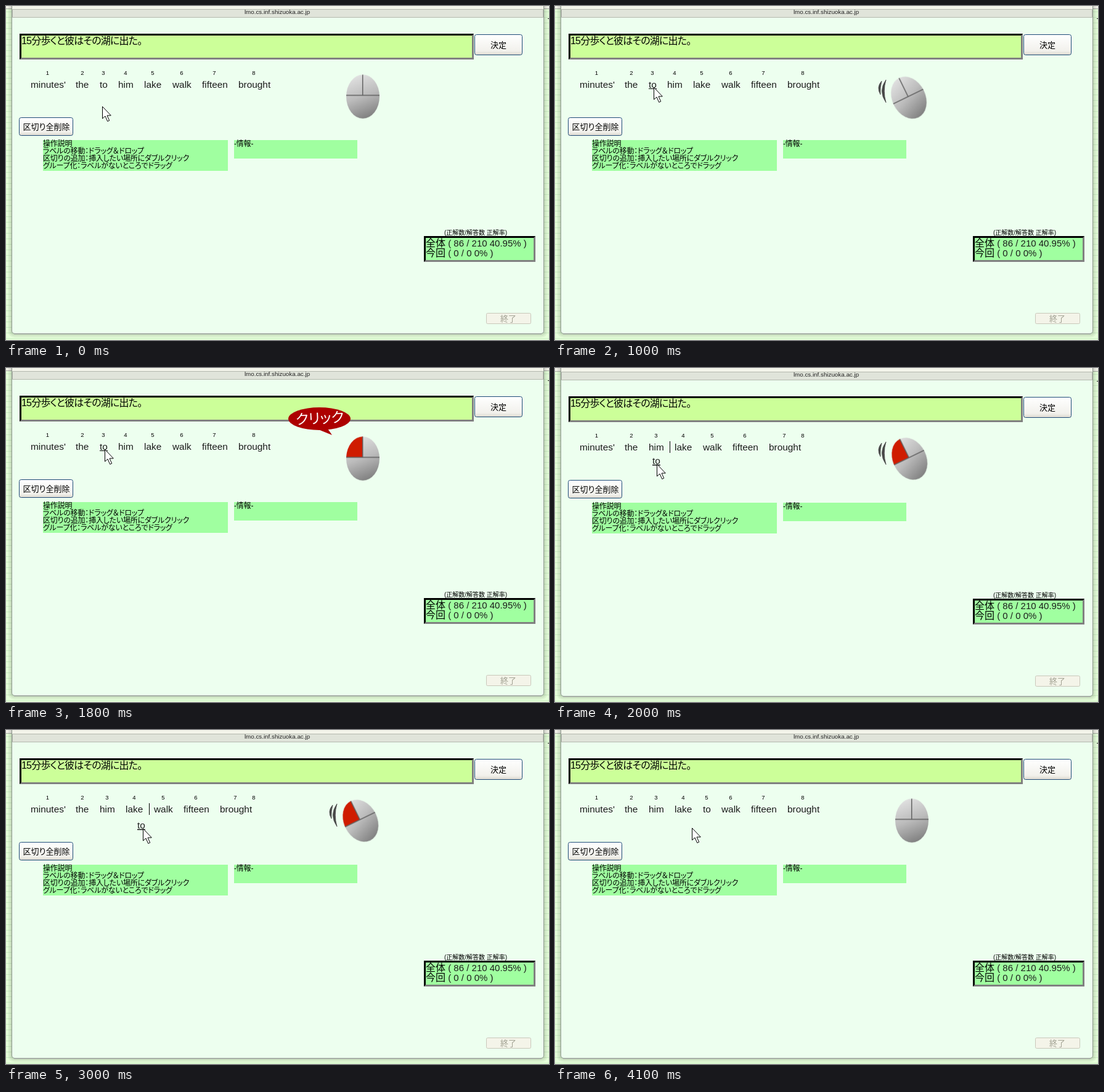
Animation of 881x543 px, one loop 4500 ms. Source, as an HTML page:

```html
<!DOCTYPE html>
<html lang="ja">
<head>
<meta charset="utf-8">
<title>並べ替え問題の操作</title>
<style>
  html, body { margin: 0; width: 100%; height: 100%; overflow: hidden; background: #e6ffda; }
  svg { display: block; width: 881px; height: 543px; }
  text {
    font: 300 16px "Liberation Sans", "Noto Sans CJK JP", "Noto Sans CJK", sans-serif;
    font-feature-settings: "palt";
    white-space: pre;
  }
  .prompt { letter-spacing: -.8px; }
  .help text { font-size: 12px; font-weight: 400; letter-spacing: -.2px; }
  .label { font-size: 13px; font-weight: 400; text-anchor: middle; }
  .address { font-size: 9.8px; text-anchor: middle; fill: #222; }
  .caption { font-size: 10px; font-weight: 500; text-anchor: middle; }
  .score { font-size: 15px; fill: #1c1c1c; }
  .word { font-size: 15.4px; fill: #1c1c1c; }
  .index { font-size: 9.5px; text-anchor: middle; }
  .shout { font-size: 23px; font-weight: 500; text-anchor: middle; fill: #fff; }
  .held { text-decoration: underline; }
  .button { fill: url(#face); stroke: #1f4a78; }
  .panel { fill: #a0ffa0; }

  .anim { animation: 4.5s step-end infinite; }
  .page { animation-name: page; }
  .before { animation-name: before; }
  .during { animation-name: during; }
  .after { animation-name: after; }
  .hover { animation-name: hover; }
  .bar { animation-name: bar; }
  .drag { animation-name: drag; }
  .cursor { animation-name: cursor; }
  .mouse { animation-name: mouse; }
  .pressed { animation-name: pressed; }
  .swing { animation-name: swing; }
  .bubble { animation-name: bubble; }

  @keyframes page { 0% { transform: none } 44.444%, 100% { transform: translateY(1px) } }
  @keyframes before { 0% { opacity: 1 } 44.444%, 100% { opacity: 0 } }
  @keyframes during { 0% { opacity: 0 } 44.444% { opacity: 1 } 77.778%, 100% { opacity: 0 } }
  @keyframes after { 0% { opacity: 0 } 77.778%, 100% { opacity: 1 } }
  @keyframes hover { 0% { opacity: 0 } 22.222% { opacity: 1 } 44.444%, 100% { opacity: 0 } }
  @keyframes pressed { 0% { opacity: 0 } 33.333% { opacity: 1 } 77.778%, 100% { opacity: 0 } }
  @keyframes bubble { 0% { opacity: 0 } 33.333% { opacity: 1 } 44.444%, 100% { opacity: 0 } }
  @keyframes swing {
    0%, 33.333% { opacity: 0 }
    22.222%, 44.444% { opacity: 1 }
    77.778%, 100% { opacity: 0 }
  }
  @keyframes bar { 0% { transform: translateX(186px) } 66.667%, 100% { transform: translateX(232px) } }
  @keyframes drag {
    0% { transform: translate(158px, 156px) }
    55.556% { transform: translate(170px, 162px) }
    66.667%, 100% { transform: translate(213px, 160px) }
  }
  @keyframes cursor {
    0% { transform: translate(156px, 163px) }
    22.222% { transform: translate(160px, 132px) }
    44.444% { transform: translate(165px, 156px) }
    55.556% { transform: translate(177px, 162px) }
    66.667% { transform: translate(222px, 160px) }
    77.778%, 100% { transform: translate(222px, 159px) }
  }
  @keyframes mouse {
    0%, 33.333% { transform: translate(579px, 147.2px) }
    22.222% { transform: translate(574px, 149px) rotate(-26deg) }
    44.444% { transform: translate(575.3px, 147.5px) rotate(-26deg) }
    77.778%, 100% { transform: translate(579px, 147.2px) }
  }
</style>
</head>
<body>
<svg viewBox="0 0 881 543">
  <defs>
    <linearGradient id="face" x2="0" y2="1">
      <stop stop-color="#fff"/><stop offset=".8" stop-color="#f2f1ec"/><stop offset="1" stop-color="#dcd8ce"/>
    </linearGradient>
    <linearGradient id="shell" x1=".3" x2=".6" y2="1">
      <stop stop-color="#e2e2e2"/><stop offset=".5" stop-color="#bcbcbc"/><stop offset="1" stop-color="#808080"/>
    </linearGradient>
    <pattern id="ruled" width="20" height="9" patternUnits="userSpaceOnUse">
      <path fill="#e6ffda" d="M0 0h20v9H0z"/><path fill="#ccefc4" d="M0 0h20v1H0z"/>
    </pattern>
    <path id="frame" d="M9.500 -9V528q0 4.500 5 4.500H867.500q5 0 5 -4.500V-9z"/>
  </defs>

  <g class="page anim">
    <path fill="url(#ruled)" d="M0 -2H881V545H0z"/>
    <path fill="#f3f4ea" d="M0 -2H881V5H0z"/>
    <path fill="#a8aca2" d="M0 4H881V5H0z"/>
    <path fill="#222" d="M879 20h2v1h-2z"/>
    <g fill="none" stroke="#000" stroke-opacity=".05">
      <use href="#frame" stroke-width="13"/>
      <use href="#frame" stroke-width="8"/>
      <use href="#frame" stroke-width="4"/>
    </g>
    <use href="#frame" fill="#edffef" stroke="#8d978d"/>
    <path fill="#a7b0a7" d="M13 532H869v2H13z"/>
    <path fill="#f3f4ea" d="M10 -2H872V5H10z"/>
    <path fill="#e0e4da" stroke="#b4b8ae" d="M10.500 5.500H871.500V18.500H10.500z"/>
    <text class="address" x="440" y="13">lmo.cs.inf.shizuoka.ac.jp</text>

    <path fill="#808080" d="M22 45H759V87H22z"/>
    <path d="M22 45H759L756 48H25V84L22 87z"/>
    <path fill="#cf9" d="M25 48H756V84H25z"/>
    <text class="prompt" x="25" y="62">15分歩くと彼はその湖に出た。</text>

    <rect class="button" x="760.5" y="46.500" width="77" height="33" rx="3"/>
    <text class="label" x="799" y="68">決定</text>
    <rect class="button" x="21.500" y="181.500" width="87" height="29" rx="3"/>
    <text class="label" x="65.500" y="201">区切り全削除</text>
    <rect x="779.5" y="499.500" width="72" height="17" rx="2" fill="#f4f4e9" stroke="#c9c7ba"/>
    <text class="label" x="815" y="513" fill="#a1a192">終了</text>

    <g class="help">
      <path class="panel" d="M60 218H360V268H60zM370 218H570V248H370z"/>
      <text x="60" y="228">操作説明</text>
      <text x="60" y="240">ラベルの移動：ドラッグ＆ドロップ</text>
      <text x="60" y="252">区切りの追加：挿入したい場所にダブルクリック</text>
      <text x="60" y="264">グループ化：ラベルがないところでドラッグ</text>
      <text x="370" y="228">-情報-</text>
    </g>

    <text class="caption" x="762" y="372">(正解数/解答数 正解率)</text>
    <path fill="#808080" d="M678 374H859V416H678z"/>
    <path d="M678 374H859L856 377H681V413L678 416z"/>
    <path class="panel" d="M681 377H856V413H681z"/>
    <text x="681" y="391">全体<tspan class="score"> ( 86 / 210 40.95% )</tspan></text>
    <text x="681" y="407">今回<tspan class="score"> ( 0 / 0 0% )</tspan></text>

    <g id="words"></g>
    <g class="during anim"><path class="bar anim" d="M0 118h1v19h-1z"/></g>
  </g>

  <g class="mouse anim">
    <ellipse rx="27" ry="35.800" fill="url(#shell)"/>
    <path class="pressed anim" fill="#cf1c00" d="M0 -2H-27A27 35.800 0 0 1 0 -35.800z"/>
    <path fill="none" stroke="#606060" stroke-width="1.500" d="M-27 -2H27M-.3 -35.500V-2"/>
  </g>
  <path class="swing anim" fill="#484848" stroke="#484848" stroke-width=".8" stroke-linejoin="round"
    d="M530 122Q521 132 528 144Q527 132 530 122zM537 120Q524 138 537 157Q531.500 138 537 120z"/>
  <g class="bubble anim">
    <path fill="#ad0000" d="M502 98L529 109L520 96z"/>
    <ellipse cx="508.500" cy="82.500" rx="50.500" ry="18.500" fill="#ad0000"/>
    <text class="shout" x="509" y="90" transform="rotate(-3 509 82)">クリック</text>
  </g>

  <g class="during anim"><text class="word held drag anim">to</text></g>
  <path class="cursor anim" fill="#fff" stroke="#000"
    d="M.5 .5V20L5 16L8.700 24.500L11.700 23.200L8 15H14.300z"/>
</svg>
<script>
  const layer = document.getElementById("words");

  function add(parent, tag, attrs, content = "") {
    const el = document.createElementNS("http://www.w3.org/2000/svg", tag);
    for (const name in attrs) el.setAttribute(name, attrs[name]);
    el.textContent = content;
    return parent.appendChild(el);
  }

  function addRow(phase, words, starts, centers) {
    const row = add(layer, "g", { class: phase + " anim" });
    words.split(" ").forEach((word, i) => add(row, "text", { class: "word", x: starts[i], y: 133 }, word));
    centers.forEach((x, i) => add(row, "text", { class: "index", x, y: 112 }, i + 1));
    return row;
  }

  const before = addRow("before", "minutes' the to him lake walk fifteen brought",
    [40, 113, 152, 182, 224, 270, 318, 377], [67.5, 124, 158, 194, 238, 285, 338, 402]);
  addRow("during", "minutes' the him lake walk fifteen brought",
    [40, 113, 152, 194, 240, 288, 347], [67.5, 124, 164, 208, 255, 308, 372, 402]);
  addRow("after", "minutes' the him lake to walk fifteen brought",
    [40, 113, 152, 194, 240, 270, 318, 377], [67.5, 124, 164, 208, 246, 285, 338, 402]);
  add(before, "path", { class: "hover anim", d: "M152 134h13v1h-13z" });
</script>
</body>
</html>
```
